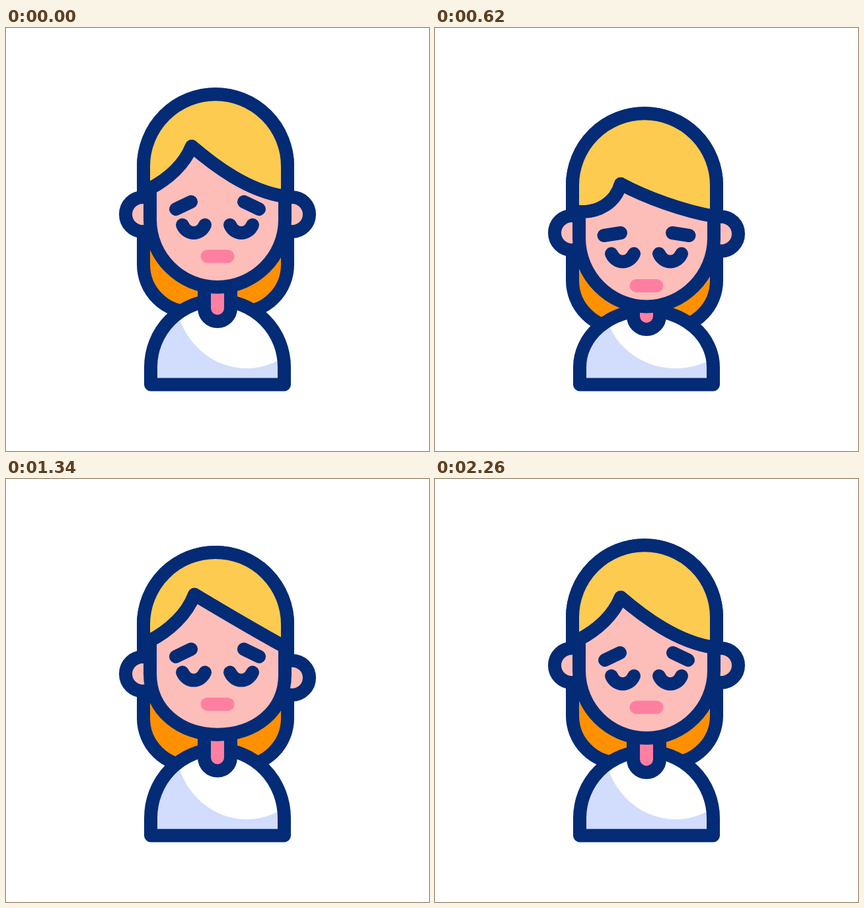
Animation, 640 px wide and 640 px high, one loop 2.4 s. Source, as an HTML page with a canvas:

```html
<!DOCTYPE html>
<html lang="en">
<head>
<meta charset="utf-8">
<title>Sad nod</title>
<style>
  html, body { margin: 0; width: 100%; height: 100%; overflow: hidden; background: #fff; }
  canvas { display: block; width: 640px; height: 640px; }
</style>
</head>
<body>
<canvas id="stage" width="640" height="640"></canvas>
<script>
const ctx = document.getElementById('stage').getContext('2d');
const LOOP = 2400, DOWN_AT = 620, UP_AT = 1510, REST_AT = 2260;
const NAVY = '#032b76', YELLOW = '#fdcb50', ORANGE = '#ff9100', SKIN = '#fdbeba',
      PINK = '#ff7fa1', SHADE = '#d2dcfd', WHITE = '#ffffff';

const ease = x => x * x * (3 - 2 * x);

// Weights of the lowered and raised head poses; rest is zero for both.
let down = 0, up = 0;

function setPose(t) {
  down = up = 0;
  if (t < DOWN_AT) {
    down = ease(t / DOWN_AT);
  } else if (t < UP_AT) {
    up = ease((t - DOWN_AT) / (UP_AT - DOWN_AT));
    down = 1 - up;
  } else if (t < REST_AT) {
    up = 1 - ease((t - UP_AT) / (REST_AT - UP_AT));
  }
}

const mix = (rest, atDown, atUp) => rest + atDown * down + atUp * up;

function paint(path, fill, stroke = NAVY) {
  if (fill) {
    ctx.fillStyle = fill;
    ctx.fill(path);
  }
  if (stroke) {
    ctx.strokeStyle = stroke;
    ctx.stroke(path);
  }
}

function drawEar(x, y) {
  const p = new Path2D();
  p.arc(x, y, 26, 0, 2 * Math.PI);
  paint(p, SKIN);
}

function drawBackHair(crown) {
  const low = mix(358, 24, 2);
  const p = new Path2D();
  p.arc(317, crown, 109, Math.PI, 0);
  p.lineTo(426, low);
  p.arc(354, low, 72, 0, Math.PI / 2);
  p.lineTo(280, low + 72);
  p.arc(280, low, 72, Math.PI / 2, Math.PI);
  p.closePath();
  paint(p, ORANGE);
}

function drawBody() {
  const p = new Path2D();
  p.moveTo(219, 539.5);
  p.lineTo(219, 513);
  p.ellipse(320, 513, 101, mix(101, -15, 5), 0, Math.PI, 0);
  p.lineTo(421, 539.5);
  p.closePath();
  paint(p, SHADE, null);
  ctx.save();
  ctx.clip(p);
  const lightY = mix(401, 12, -3);
  const light = new Path2D();
  light.ellipse(364, lightY, 108, 515 - lightY, 0, 0, 2 * Math.PI);
  paint(light, WHITE, null);
  ctx.restore();
  paint(p, null);
}

function drawNeck() {
  const y = mix(424, 12, -4);
  const p = new Path2D();
  p.moveTo(340, 370);
  p.lineTo(340, y);
  p.arc(320, y, 20, 0, Math.PI);
  p.lineTo(300, 370);
  paint(p, PINK);
}

function drawHead(crown) {
  const fringeLeft = mix(243, 35, -2), fringeRight = mix(255, 30, -4);

  function addFringe(p) {
    p.moveTo(218, fringeLeft);
    p.bezierCurveTo(246, mix(228, 52, -3), mix(270, 3, 4), mix(206, 59, -7),
                    mix(281, 0, 4.5), mix(179, 57, -10.5));
    p.bezierCurveTo(mix(315, 5, 16), mix(208, 49, -12), mix(366, 10, 10), mix(247, 30, -23),
                    422, fringeRight);
  }

  const cap = new Path2D();
  addFringe(cap);
  cap.lineTo(426, fringeRight);
  cap.lineTo(426, crown);
  cap.arc(317, crown, 109, 0, Math.PI, true);
  cap.lineTo(208, fringeLeft);
  cap.closePath();
  paint(cap, YELLOW);

  const left = mix(290, 28, 2), right = mix(290, 28, 4), chin = mix(392, 29.5, -9);
  const face = new Path2D();
  addFringe(face);
  face.lineTo(422, right);
  face.bezierCurveTo(422, right + 56, 376, chin, 320, chin);
  face.bezierCurveTo(264, chin, 218, left + 56, 218, left);
  face.closePath();
  paint(face, SKIN);
}

function drawFeatures() {
  const eyeY = mix(298, 43.5, -10.5);
  const browX = mix(63, 1.5, 0), browEndX = mix(40, -1, 0);
  for (const side of [-1, 1]) {
    const at = dx => 320 + side * dx;
    const eye = new Path2D();
    eye.moveTo(at(53), eyeY);
    eye.bezierCurveTo(at(46), eyeY + 16, at(26), eyeY + 16, at(19), eyeY);
    paint(eye, null);
    const brow = new Path2D();
    brow.moveTo(at(browX), mix(274, 40, -10));
    brow.lineTo(at(browEndX), mix(263, 47, -11));
    paint(brow, null);
  }
  const mouthY = mix(345.5, 44.5, -10);
  const mouth = new Path2D();
  mouth.moveTo(304.5, mouthY);
  mouth.lineTo(335.5, mouthY);
  paint(mouth, null, PINK);
}

function draw(t) {
  setPose(t);
  ctx.fillStyle = WHITE;
  ctx.fillRect(0, 0, 640, 640);
  ctx.lineWidth = 20;
  ctx.lineCap = ctx.lineJoin = 'round';
  const crown = mix(209.2, 29, 8.8);
  drawBackHair(crown);
  drawBody();
  drawNeck();
  drawEar(207, mix(282, 28, 11.5));
  drawEar(433, mix(282, 29.5, 17.5));
  drawHead(crown);
  drawFeatures();
}

const start = performance.now();
function tick() {
  draw((performance.now() - start) % LOOP);
  requestAnimationFrame(tick);
}
tick();
</script>
</body>
</html>
```
